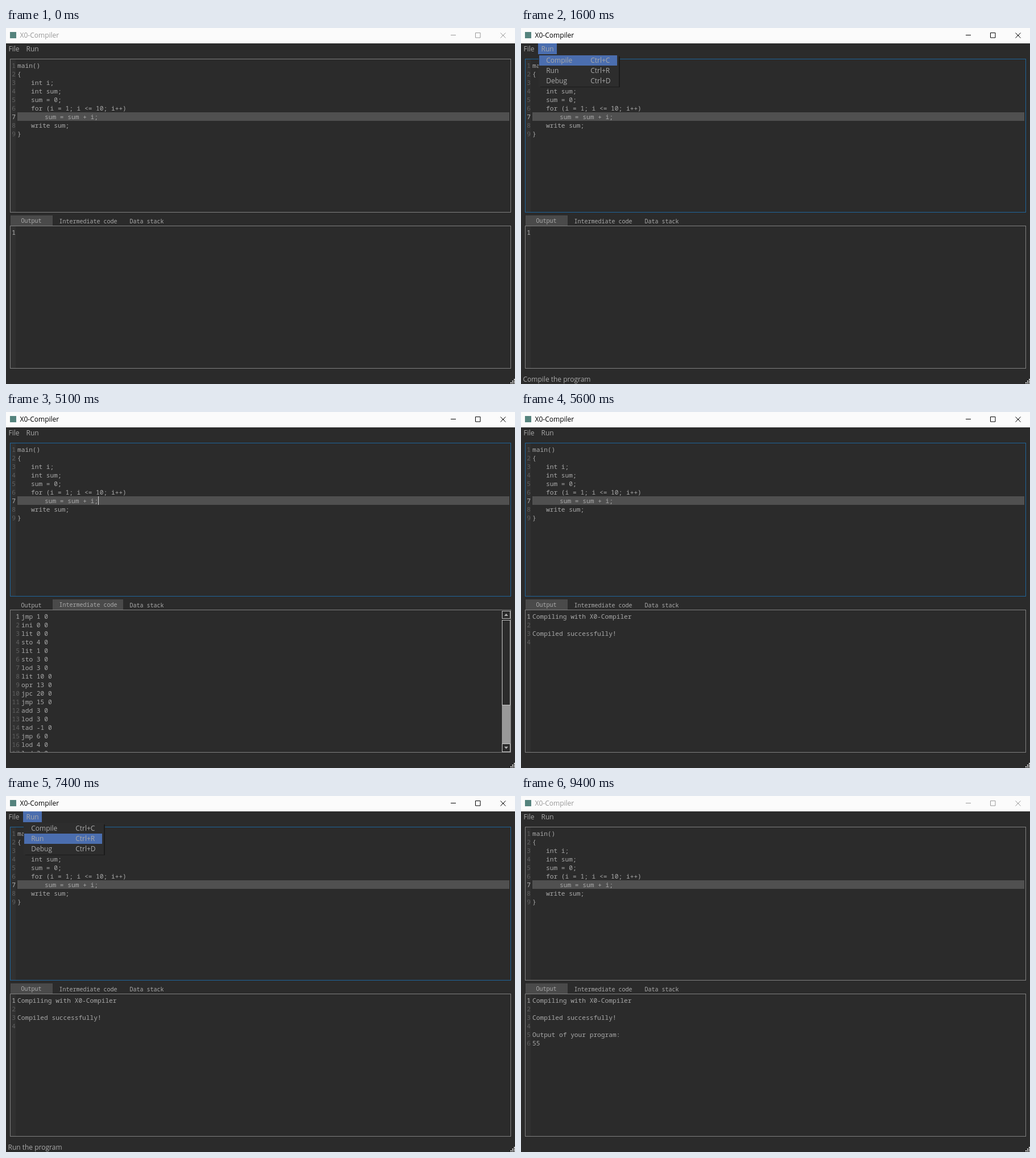
An HTML page that plays this animation: 895 px wide and 625 px high, repeating every 9500 ms.

```html
<!DOCTYPE html>
<html lang="en">
<head>
<meta charset="utf-8">
<title>X0-Compiler</title>
<style>
  html, body { margin: 0; width: 100%; height: 100%; overflow: hidden; background: #2b2b2b; }
  svg { display: block; width: 895px; height: 625px; }
  text { font: 12px "Open Sans", "Noto Sans", sans-serif; fill: #a9a9a9; }
  .code text { font: 11.2px "Noto Sans Mono", monospace; }
  .code .num { fill: #606060; text-anchor: end; }
  .code .current { fill: #b4b4b4; }
  .tabs text { font: 10px "Noto Sans Mono", monospace; }
  .gutter { fill: #313131; }
  .hot { fill: #4b6eaf; }
  .pane { fill: none; stroke: #808080; }

  /* 9.5 s loop with hard steps */
  .step { animation: 9.5s step-end infinite; }
  #title { animation-name: title; }
  #buttons { fill: none; animation-name: buttons; }
  #editor { animation-name: focus; }
  #runHover { animation-name: hover; }
  #menu { animation-name: menu; }
  .compileItem { animation-name: compileItem; }
  .runItem { animation-name: runItem; }
  #caret { animation-name: caret; }
  #output { animation-name: output; }
  #listing { animation-name: listing; }
  #compiled { animation-name: compiled; }
  #ran { animation-name: ran; }

  @keyframes title { 0%, 98.947% { fill: #999; } 9.473% { fill: #000; } }
  @keyframes buttons { 0%, 98.947% { stroke: #999; } 9.473% { stroke: #000; } }
  @keyframes focus { 0%, 98.947% { stroke: #808080; } 9.473% { stroke: #1f659b; } }
  @keyframes hover {
    0%, 23.157%, 84.21% { opacity: 0; }
    6.315%, 72.631% { opacity: 1; }
  }
  @keyframes menu {
    0%, 23.157%, 84.21% { opacity: 0; }
    10.526%, 72.631% { opacity: .55; }
    11.578%, 73.684% { opacity: 1; }
  }
  @keyframes compileItem {
    0%, 23.157%, 77.894% { opacity: 0; }
    16.842%, 75.789% { opacity: 1; }
  }
  @keyframes runItem { 0%, 84.21% { opacity: 0; } 77.894% { opacity: 1; } }
  @keyframes caret {
    0%, 27.368%, 37.894%, 48.421%, 58.947%, 68.421%, 89.473%, 98.947% { opacity: 0; }
    23.157%, 32.631%, 43.157%, 53.684%, 63.157%, 84.21%, 94.736% { opacity: 1; }
  }
  @keyframes output { 0%, 56.842% { opacity: 1; } 40% { opacity: 0; } }
  @keyframes listing { 0%, 56.842% { opacity: 0; } 40% { opacity: 1; } }
  @keyframes compiled { 0% { opacity: 0; } 23.157% { opacity: 1; } }
  @keyframes ran { 0% { opacity: 0; } 84.21% { opacity: 1; } }
</style>
</head>
<body>
<svg viewBox="0 0 895 625">
  <defs>
    <clipPath id="lowerClip"><rect x="8" y="348" width="880" height="249"/></clipPath>
  </defs>
  <rect width="895" height="625" fill="#2b2b2b"/>

  <!-- title bar -->
  <rect width="895" height="27" fill="#fbfbfb"/>
  <rect x="7" y="7" width="11" height="11" fill="#55837d"/>
  <text id="title" class="step" x="24.5" y="17">X0-Compiler</text>
  <path id="buttons" class="step" d="M782 12.5h9M825.5 8.5h8.5v8.5h-8.5zM869.5 8.5l9 9m0-9l-9 9"/>

  <!-- menu bar -->
  <rect id="runHover" class="step hot" x="30" y="27" width="33" height="19"/>
  <text x="4.5" y="41">File</text>
  <text x="35.5" y="41">Run</text>

  <!-- editor -->
  <rect class="gutter" x="8" y="55" width="9" height="268"/>
  <rect x="20" y="148" width="865" height="15" fill="#505050"/>
  <g id="source" class="code"></g>
  <rect id="caret" class="step" x="162" y="148" width="1" height="15" fill="#d4d4d4"/>
  <rect id="editor" class="step pane" x="7.5" y="54.5" width="880" height="269"/>

  <!-- lower pane -->
  <rect class="pane" x="7.5" y="347.5" width="880" height="250"/>
  <g id="output" class="step">
    <g class="tabs">
      <rect x="8" y="329" width="74" height="18" fill="#4a4a4a"/>
      <text x="26.5" y="342">Output</text>
      <text x="93.5" y="343">Intermediate code</text>
    </g>
    <rect class="gutter" x="8" y="348" width="9" height="249"/>
    <g id="first" class="code"></g>
    <g id="compiled" class="code step"></g>
    <g id="ran" class="code step"></g>
  </g>
  <g id="listing" class="step">
    <g class="tabs">
      <rect x="82" y="329" width="124" height="18" fill="#4a4a4a"/>
      <text x="26.5" y="343">Output</text>
      <text x="93.5" y="342">Intermediate code</text>
    </g>
    <rect class="gutter" x="8" y="348" width="16" height="249"/>
    <g id="instructions" class="code" clip-path="url(#lowerClip)"></g>
    <rect x="872" y="348" width="15" height="249" fill="#1c1c1c"/>
    <rect x="872" y="515" width="15" height="67" fill="#999"/>
    <g fill="#2b2b2b" stroke="#c8c8c8">
      <rect x="872.5" y="349.5" width="14" height="13"/>
      <rect x="872.5" y="365.5" width="14" height="149"/>
      <rect x="872.5" y="582.5" width="14" height="14"/>
    </g>
    <path d="M876 358l3.5-4 3.5 4zM876 587.5l3.5 4 3.5-4z" fill="#b4b4b4"/>
  </g>
  <g class="tabs"><text x="217.5" y="343">Data stack</text></g>

  <!-- drop-down menu -->
  <g id="menu" class="step">
    <rect x="34" y="50" width="140" height="54" fill="#1b1b1b"/>
    <rect x="31" y="47" width="141" height="56" fill="#2d2d2d"/>
    <rect class="step hot compileItem" x="32" y="48" width="137" height="18"/>
    <rect class="step hot runItem" x="32" y="66" width="137" height="18"/>
    <text x="44.2" y="61">Compile</text><text x="122.2" y="61">Ctrl+C</text>
    <text x="44.2" y="79">Run</text><text x="122.2" y="79">Ctrl+R</text>
    <text x="44.2" y="97">Debug</text><text x="122.2" y="97">Ctrl+D</text>
  </g>

  <!-- status bar -->
  <text class="step compileItem" x="3.5" y="621">Compile the program</text>
  <text class="step runItem" x="3.5" y="621">Run the program</text>
  <path d="M893 616h2v2h-2zM890 619h2v2h-2zM893 619h2v2h-2zM887 622h2v2h-2zM890 622h2v2h-2zM893 622h2v2h-2z" fill="#e4e4e4"/>
</svg>
<script>
  const LINE = 15, TAB = 24;

  function addText(parent, x, y, content, className) {
    const node = document.createElementNS(parent.namespaceURI, "text");
    node.setAttribute("x", x);
    node.setAttribute("y", y);
    if (className) node.setAttribute("class", className);
    node.textContent = content;
    parent.append(node);
  }

  // Numbered lines; leading tabs become fixed indents.
  function addLines(id, lines, { y, first = 1, current = 1, gutter = 17 }) {
    const parent = document.getElementById(id);
    lines.forEach((line, i) => {
      const number = first + i, baseline = y + (number - 1) * LINE;
      const code = line.trimStart(), indent = line.length - code.length;
      addText(parent, gutter, baseline, number, number === current ? "num current" : "num");
      if (code) addText(parent, gutter + 3 + indent * TAB, baseline, code);
    });
  }

  addLines("source", [
    "main()", "{", "\tint i;", "\tint sum;", "\tsum = 0;",
    "\tfor (i = 1; i <= 10; i++)", "\t\tsum = sum + i;", "\twrite sum;", "}"
  ], { y: 70, current: 7 });

  addLines("first", [""], { y: 363 });
  addText(document.getElementById("compiled"), 20, 363, "Compiling with X0-Compiler");
  addLines("compiled", ["", "Compiled successfully!", ""], { y: 363, first: 2 });
  addLines("ran", ["Output of your program:", "55"], { y: 363, first: 5 });

  addLines("instructions", [
    "jmp 1 0", "ini 0 0", "lit 0 0", "sto 4 0", "lit 1 0", "sto 3 0",
    "lod 3 0", "lit 10 0", "opr 13 0", "jpc 20 0", "jmp 15 0", "add 3 0",
    "lod 3 0", "tad -1 0", "jmp 6 0", "lod 4 0", "lod 3 0"
  ], { y: 363, gutter: 24 });
</script>
</body>
</html>
```
